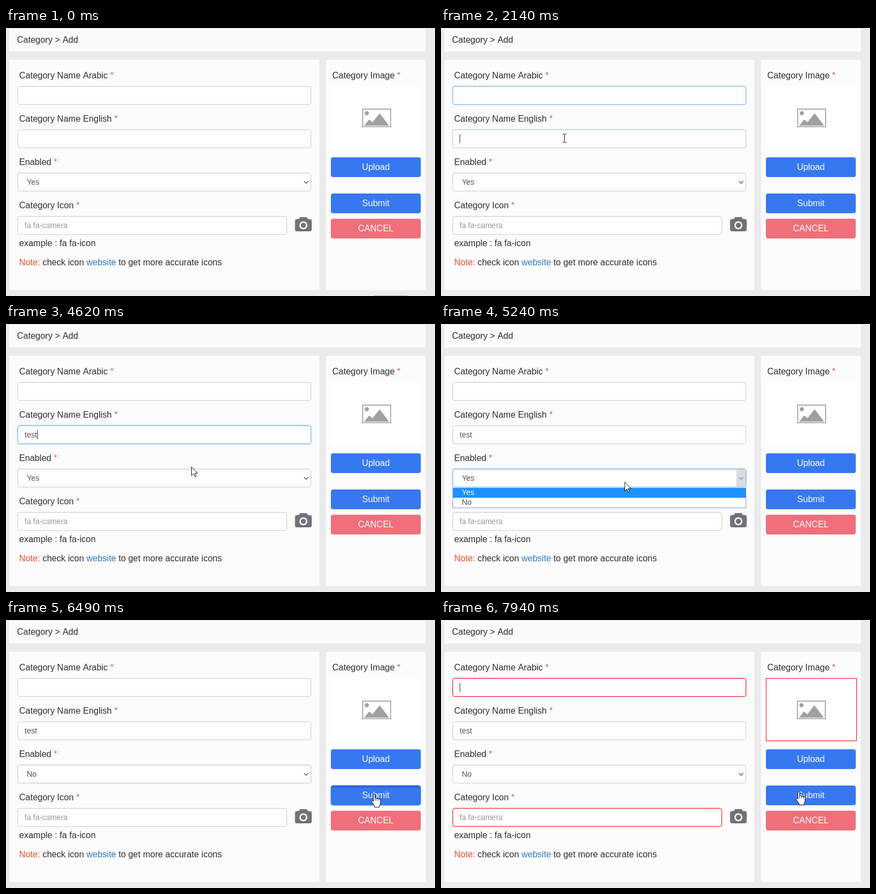
These frames come from a looping animation (783x489 px, 8 s). An HTML page with a canvas:

```html
<!DOCTYPE html>
<html lang="en">
<head>
<meta charset="utf-8">
<title>Category form</title>
<style>
  html, body { margin: 0; width: 100%; height: 100%; overflow: hidden; background: #ebebeb; }
  canvas { display: block; }
</style>
</head>
<body>
<canvas id="stage" width="783" height="489"></canvas>
<script>
const ctx = document.getElementById('stage').getContext('2d');
const LOOP = 8000, STEP = 77, BLINK = 530;
const FONT = '"Liberation Sans", Arial, sans-serif';
const INK = '#2e2e2e', BLUE = '#3678f0', RED = '#f00808', PAPER = '#fefefe';

// Moments of the user's actions
const arabicClick = 1060, englishClick = 2120, typing = 2600, keyGap = 213, typingEnd = 3700;
const selectClick = 4900, listOpen = 5010, listPick = 5710;
const submitClick = 6390, rejected = 6550;

// Pointer moves: start, end, destination
const moves = [
  [140, 290, 409, 187], [590, 900, 262, 101], [970, 1360, 222, 122],
  [1760, 2060, 225, 201], [4160, 4400, 631, 315], [4470, 4620, 338, 260],
  [4930, 5240, 335, 288], [5310, 5540, 330, 329], [5710, 6090, 673, 317],
  [6870, 7250, 455, 71], [7320, 7630, 395, 123], [7710, 7940, 654, 313]
];

const clamp = v => Math.max(0, Math.min(1, v));
const ease = u => u * u * (3 - 2 * u);
const within = (t, a, b) => t >= a && t < b;
const focus = (t, on, off = Infinity) => clamp((t - on) / 100) - clamp((t - off) / 100);
const mix = (a, b, k) => 'rgb(' + a.map((v, i) => Math.round(v + (b[i] - v) * k)) + ')';
const blinkOn = (t, from) => Math.floor((t - from) / BLINK) % 2 === 0;

// The pointer advances in screen-refresh steps and starts below the stage.
function pointerAt(t) {
  let x = 726, y = 535;
  for (const [start, end, toX, toY] of moves) {
    if (t < start) break;
    const n = Math.round((end - start) / STEP);
    const done = t >= end ? 1 : (Math.floor((t - start) / (end - start) * n) + 1) / (n + 1);
    x += (toX - x) * ease(done);
    y += (toY - y) * ease(done);
  }
  return [Math.round(x), Math.round(y)];
}

function rect(x, y, w, h, color) {
  ctx.fillStyle = color;
  ctx.fillRect(x, y, w, h);
}

function round(x, y, w, h, r) {
  ctx.beginPath();
  ctx.roundRect(x, y, w, h, r);
}

function text(s, x, y, color = INK, size = 16, align = 'left') {
  ctx.font = size + 'px ' + FONT;
  ctx.textAlign = align;
  ctx.fillStyle = color;
  ctx.fillText(s, x, y);
  return x + ctx.measureText(s).width;
}

function label(s, x, y) {
  text('*', text(s + ' ', x, y), y, '#d9603f');
}

function field(y, w, glow = 0, bad = false) {
  const x = 21, h = 34;
  if (glow > 0) {
    ctx.save();
    ctx.shadowColor = `rgba(102,175,233,${0.45 * glow})`;
    ctx.shadowBlur = 4;
    round(x, y, w, h, 4);
    ctx.fillStyle = PAPER;
    ctx.fill();
    ctx.restore();
  }
  round(x + 0.5, y + 0.5, w - 1, h - 1, 3.5);
  ctx.fillStyle = PAPER;
  ctx.fill();
  rect(x + 2, y + 1, w - 4, 1, '#f3f3f3');
  ctx.strokeStyle = bad ? RED : mix([204, 204, 204], [102, 175, 233], glow);
  ctx.lineWidth = 1;
  ctx.stroke();
}

function button(s, y, color) {
  round(593, y, 164, 36, 4);
  ctx.fillStyle = color;
  ctx.fill();
  text(s, 675, y + 23, '#fff', 16, 'center');
}

function pressedEdge(y) {
  const g = ctx.createLinearGradient(0, y, 0, y + 6);
  g.addColorStop(0, 'rgba(0,20,90,.25)');
  g.addColorStop(1, 'rgba(0,20,90,0)');
  rect(594, y, 162, 6, g);
  round(592.5, y - 0.5, 165, 37, 4.5);
  ctx.strokeStyle = '#a3c2f6';
  ctx.lineWidth = 1;
  ctx.stroke();
}

function chevron(color) {
  ctx.beginPath();
  ctx.moveTo(544, 279.5);
  ctx.lineTo(547.8, 283.2);
  ctx.lineTo(551.5, 279.5);
  ctx.strokeStyle = color;
  ctx.lineWidth = 1.5;
  ctx.stroke();
}

function shape(d, color) {
  ctx.fillStyle = color;
  ctx.fill(new Path2D(d));
}

function disc(x, y, r, color) {
  ctx.beginPath();
  ctx.arc(x, y, r, 0, 7);
  ctx.fillStyle = color;
  ctx.fill();
}

function camera() {
  const gray = '#717379';
  round(527.5, 348.5, 30.5, 22.5, 3.5);
  ctx.fillStyle = gray;
  ctx.fill();
  shape('M534 349.5L536 346Q536.5 345 538 345H547.5Q549 345 549.5 346L551.5 349.5Z', gray);
  disc(542.8, 360, 7.3, '#fcfcfc');
  disc(542.8, 360, 4.7, gray);
}

function picture(bad) {
  const gray = '#a0a0a2';
  rect(593, 106, 164, 115, PAPER);
  ctx.lineWidth = 1;
  ctx.strokeStyle = RED;
  if (bad) ctx.strokeRect(593.5, 106.5, 165, 114);
  ctx.save();
  if (bad) ctx.translate(-0.5, 0);
  ctx.strokeStyle = gray;
  ctx.lineWidth = 1.7;
  ctx.strokeRect(651, 148, 51, 32);
  disc(658.5, 155.5, 3.7, gray);
  shape('M654 178L663 167L669 172L682 155.5L699 178Z', gray);
  ctx.restore();
}

function dropdown(second) {
  rect(21, 298, 536, 38, '#7e9cd0');
  rect(22, 298, 534, 37, PAPER);
  rect(22, second ? 317 : 299, 534, 18, '#1e90ff');
  text('Yes', 38, 312, second ? '#555' : '#fff', 14);
  text('No', 38, 330, second ? '#fff' : '#555', 14);
}

function outline(d) {
  shape(d, '#fff');
  ctx.strokeStyle = '#000';
  ctx.lineWidth = 0.9;
  ctx.stroke(new Path2D(d));
}

function beam() {
  rect(0, -7, 1, 14, '#111');
  for (const side of [-8, 7]) {
    rect(-3, side, 3, 1, '#111');
    rect(1, side, 3, 1, '#111');
  }
}

function hand() {
  outline('M-2.5 14V1.5Q-2.5 .5-1 .5T.5 1.5V8Q1 6.8 2.5 7.2T4 9Q4.5 7.8 6 8.3T7.5 10' +
          'Q8 9 9.3 9.5T10.5 11V17Q10.5 20 8.5 22V24.5H-.5V22Q-2 20-5 15.5Q-6.5 13-5 12.3T-2.5 14Z');
  for (let x = 0; x < 9; x += 3.5) rect(x, 8, 0.9, 4.5, '#000');
}

function pointer(x, y) {
  const over = (l, t, r, b) => x >= l && x < r && y >= t && y < b;
  const overText = over(21, 106, 557, 140) || over(21, 185, 557, 219) || over(21, 343, 513, 377);
  const overButton = over(593, 236, 757, 272) || over(593, 302, 757, 384);
  ctx.save();
  ctx.translate(x, y);
  if (overText) beam();
  else if (overButton) hand();
  else outline('M.5 .5V16.8L4.3 13.3L6.8 18.7L9 17.7L6.6 12.3H11.8Z');
  ctx.restore();
}

function caret(x, y) {
  rect(Math.round(x), y, 1, 16, INK);
}

function draw(t) {
  const bad = t >= rejected;
  const open = within(t, listOpen, listPick);
  const [px, py] = pointerAt(t);

  rect(0, 0, 783, 489, '#ebebeb');
  rect(6, 1, 760, 42, '#fafafa');
  rect(6, 58, 566, 420, '#fcfcfc');
  rect(584, 58, 182, 420, '#fcfcfc');
  if (t < arabicClick) for (let x = 673; x < 732; x += 2) rect(x, 488, 1, 1, '#777');

  text('Category > Add', 20, 27);
  ['Category Name Arabic', 'Category Name English', 'Enabled', 'Category Icon']
    .forEach((s, i) => label(s, 24, 92 + 79 * i));
  label('Category Image', 595.5, 92);

  field(106, 536, focus(t, arabicClick, englishClick) + focus(t, rejected), bad);
  field(185, 536, focus(t, englishClick, selectClick));
  field(264, 536, focus(t, selectClick, submitClick + 20));
  field(343, 492, 0, bad);

  const keys = Math.floor((t - typing) / keyGap) + 1;
  const end = text('test'.slice(0, Math.max(0, keys)), 34, 207, '#555', 14);
  if (within(t, arabicClick, arabicClick + BLINK) || bad && blinkOn(t, rejected)) caret(34, 115);
  if (within(t, englishClick, selectClick) && (t < typingEnd || !blinkOn(t, typingEnd - 70)))
    caret(end, 194);

  text(t < listPick ? 'Yes' : 'No', 38, 286, '#555', 14);
  if (open) rect(539, 265, 17, 32, '#dcdcdc');
  chevron(open ? '#6f9fc0' : '#5c5c5c');

  text('fa fa-camera', 34, 365, '#999', 14);
  camera();
  text('example : fa fa-icon', 24, 398);
  let x = text('Note: ', 24, 433, '#e8512f');
  x = text('check icon ', x, 433);
  x = text('website', x, 433, '#337ab7');
  text(' to get more accurate icons', x, 433);

  picture(bad);
  button('Upload', 236, BLUE);
  button('Submit', 302, BLUE);
  button('CANCEL', 348, '#f16f7b');
  if (within(t, submitClick, rejected)) pressedEdge(302);

  if (open) dropdown(py >= 317);
  pointer(px, py);
}

function frame(now) {
  draw(now % LOOP);
  requestAnimationFrame(frame);
}
requestAnimationFrame(frame);
</script>
</body>
</html>
```
